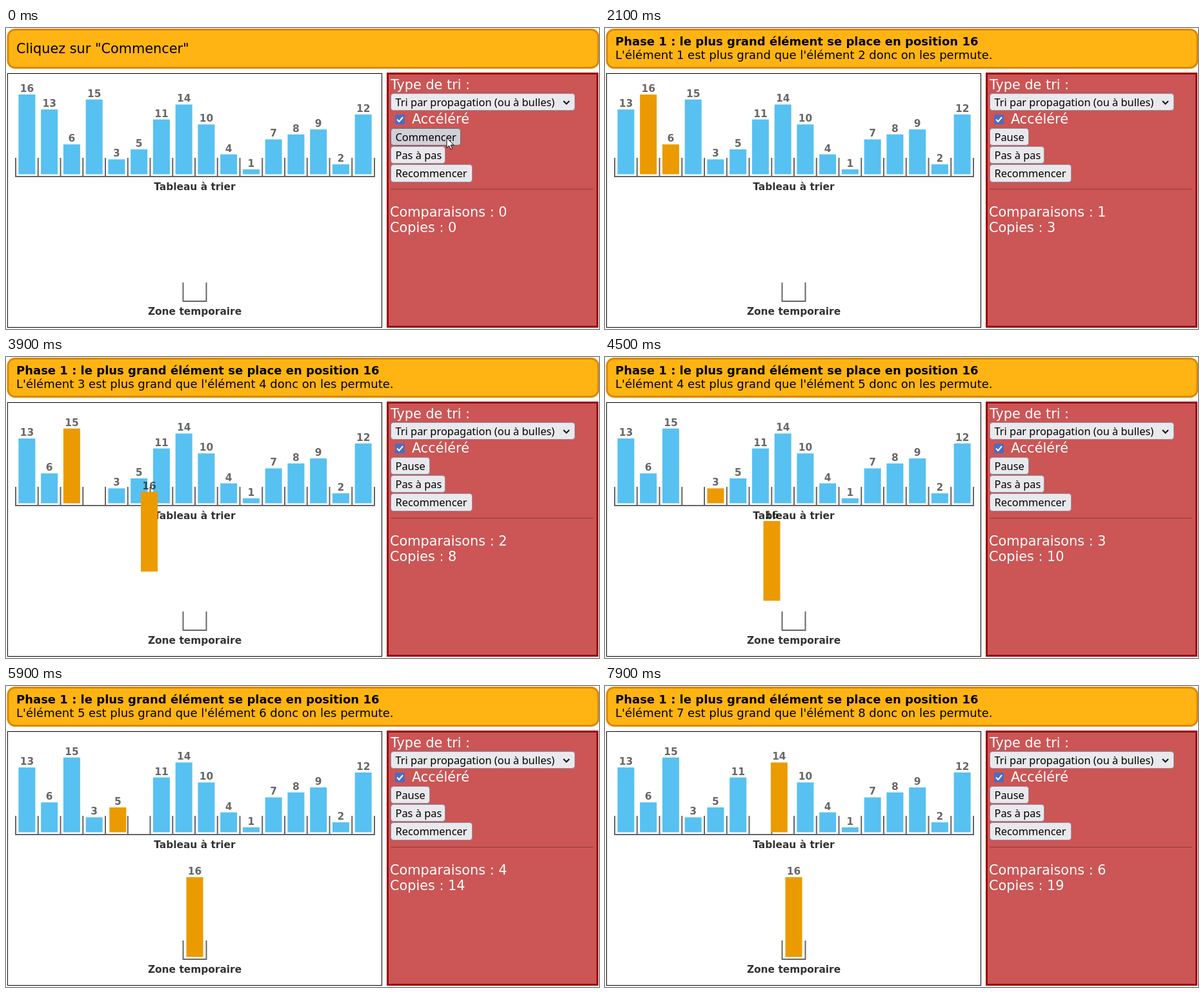
An HTML page that plays this animation: 919x466 px, repeating every 8000 ms.

```html
<!DOCTYPE html>
<html lang="fr">
<head>
<meta charset="utf-8">
<title>Tri par propagation</title>
<style>
html, body { margin: 0; width: 100%; height: 100%; overflow: hidden; background: #fff }
svg { display: block; width: 919px; height: 466px }
text { white-space: pre; font-family: "DejaVu Sans", sans-serif }
.big { font-size: 20.8px }
.line { font-size: 18px }
.bold { font-weight: bold }
.pale { fill: #fff }
.ui text { font: 16.4px "Noto Sans", "Open Sans", sans-serif }
.ui rect { fill: #e9e9ed; stroke: #8f8f9d }
.ui #go { fill: #d0d0d7; stroke: #676774 }
.chart text { font-size: 15.4px; font-weight: bold; text-anchor: middle }
</style>
</head>
<body>
<svg viewBox="0 0 919 466">
  <rect x="3" y="2.5" width="915" height="59" rx="11" fill="#ffb413" stroke="#db8705" stroke-width="3"/>
  <text id="intro" class="big" x="16" y="39">Cliquez sur "Commencer"</text>
  <text id="phase" class="line bold" x="16" y="27">Phase 1 : le plus grand élément se place en position 16</text>
  <text id="detail" class="line" x="16" y="48"></text>

  <rect x="2.5" y="70.5" width="580" height="393" fill="#fff" stroke="#000"/>
  <g class="chart">
    <path id="walls" fill="none" stroke="#666" stroke-width="2"/>
    <text x="292.5" y="251" fill="#333">Tableau à trier</text>
    <text x="292.5" y="444" fill="#333">Zone temporaire</text>
    <g id="bars"></g>
  </g>

  <rect x="591.5" y="70.5" width="325" height="392" fill="#c55" stroke="#990000" stroke-width="3"/>
  <g class="big pale">
    <text x="596" y="95">Type de tri :</text>
    <text x="629" y="148">Accéléré</text>
    <text id="comparisons" x="595" y="292"></text>
    <text id="copies" x="595" y="316"></text>
  </g>
  <path d="M596 249.5H910" stroke="#8f3b3b"/>
  <g class="ui">
    <rect x="596.5" y="101.5" width="285" height="26" rx="4"/>
    <text x="603.5" y="121">Tri par propagation (ou à bulles)</text>
    <path d="M864 113l4.5 4.5 4.5-4.5" fill="none" stroke="#111" stroke-width="2"/>
    <rect id="go" x="596.5" y="155.5" width="108" height="26" rx="4"/>
    <rect id="pause" x="596.5" y="155.5" width="60" height="26" rx="4"/>
    <text id="goText" x="603.5" y="175"></text>
    <rect x="596.5" y="183.5" width="84" height="26" rx="4"/>
    <text x="603.5" y="203">Pas à pas</text>
    <rect x="596.5" y="211.5" width="126" height="27" rx="4"/>
    <text x="603.5" y="231">Recommencer</text>
  </g>
  <rect x="603" y="134" width="15" height="15" rx="2" fill="#4a6cc4"/>
  <path d="M606 141.5l3.2 3.5 5.8-7" fill="none" stroke="#fff" stroke-width="2"/>
  <path id="cursor" d="M683 170v15.5l3.6-3.3 2.5 5.6 2.6-1.2-2.5-5.4h4.8z" fill="#fff" stroke="#000"/>
</svg>
<script>
const $ = id => document.getElementById(id);
const LOOP = 8000, STEP = 34.75, UNIT = 7.72, FLOOR = 226.5;
const TEMP = { x: 292.5, y: 419.5 };
const values = [16, 13, 6, 15, 3, 5, 11, 14, 10, 4, 1, 7, 8, 9, 2, 12];
// start of each swap, and duration of each of its three moves
const starts = [1164, 2254, 3336, 4285, 5365, 6543, 7579];
const spans = [275, 275, 230, 275, 275, 218, 275];

const slot = i => ({ x: 32.4 + STEP * i, y: FLOOR });
const clamp = v => Math.max(0, Math.min(1, v));
const mix = (a, b, k) => ({ x: a.x + (b.x - a.x) * k, y: a.y + (b.y - a.y) * k });
const show = (id, on) => $(id).style.display = on ? '' : 'none';

let walls = 'M14 230H572M274.5 394V423H310.5V394';
for (let i = 0; i <= 16; i++) walls += `M${15 + STEP * i} 201V230`;
$('walls').setAttribute('d', walls);

function make(tag, attrs) {
  const el = document.createElementNS('http://www.w3.org/2000/svg', tag);
  for (const k in attrs) el.setAttribute(k, attrs[k]);
  return el;
}

const bars = values.map(v => {
  const g = make('g'), h = v * UNIT;
  const box = make('rect', { x: -13, y: -h, width: 26, height: h });
  const label = make('text', { y: -h - 4, fill: '#000', 'fill-opacity': .6 });
  label.textContent = v;
  g.append(box, label);
  return { g, box };
});
// the travelling bar is painted above the others
[...bars.slice(1), bars[0]].forEach(b => $('bars').append(b.g));

function place(i, p, active) {
  bars[i].g.setAttribute('transform', `translate(${p.x} ${p.y})`);
  bars[i].box.setAttribute('fill', active ? '#eb9b00' : '#57c1f1');
}

function draw(t) {
  let big = slot(0), copies = 0, comparisons = 0, swap = 0;
  values.forEach((v, i) => { if (i) place(i, slot(i), false); });

  starts.forEach((start, k) => {
    const span = spans[k];
    const [a, b, c] = [0, 1, 2].map(n => clamp((t - start) / span - n));
    for (const move of [a, b, c]) if (move >= .5) copies++;
    if (c >= 1) comparisons++;
    if (a > 0) {
      swap = k + 1;
      big = c > 0 ? mix(TEMP, slot(k + 1), c) : mix(slot(k), TEMP, a);
    }
    const release = (starts[k + 1] || Infinity) - 250;
    place(k + 1, mix(slot(k + 1), slot(k), b), t >= start - 160 && t < release);
  });
  place(0, big, t >= 1000);

  const running = t >= 900;
  show('go', !running);
  show('pause', running);
  show('cursor', !running);
  show('intro', t < 1000);
  show('phase', t >= 1000);
  $('goText').textContent = running ? 'Pause' : 'Commencer';
  $('detail').textContent = swap
    ? `L'élément ${swap} est plus grand que l'élément ${swap + 1} donc on les permute.` : '';
  $('comparisons').textContent = 'Comparaisons : ' + comparisons;
  $('copies').textContent = 'Copies : ' + copies;
}

function frame() {
  // ten pictures a second, with one short stall
  let t = Math.floor(performance.now() % LOOP / 100) * 100;
  if (t > 2400 && t < 2700) t = 2400;
  draw(t);
  requestAnimationFrame(frame);
}
frame();
</script>
</body>
</html>
```
